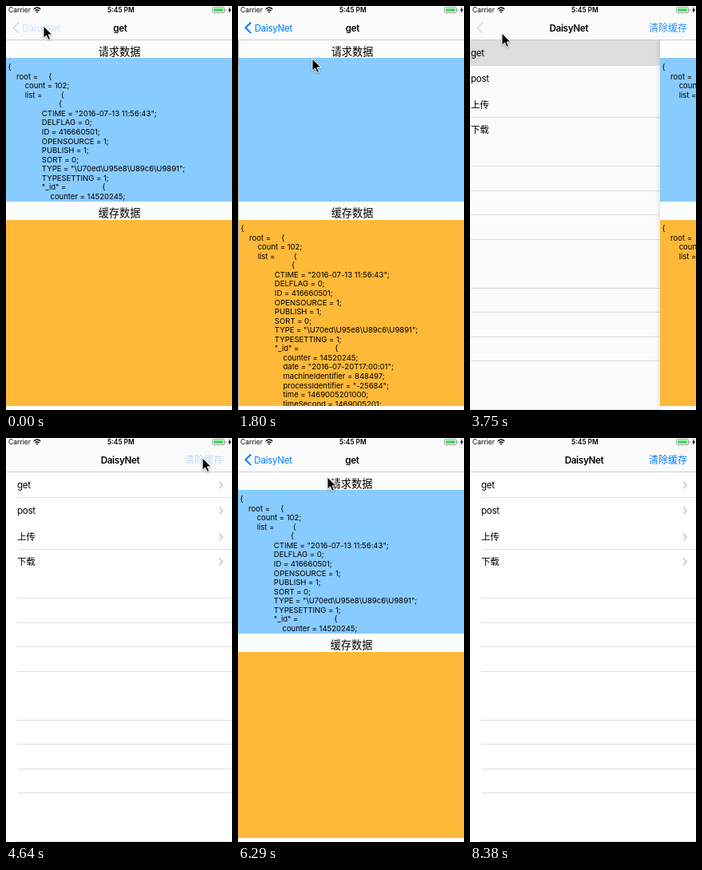
Write an HTML page that moves like this. It is 283 by 506 pixels and loops after 8770 ms.

```html
<!DOCTYPE html>
<html lang="zh-CN">
<head>
<meta charset="utf-8">
<title>DaisyNet</title>
<style>
html, body { margin: 0; width: 100%; height: 100%; overflow: hidden; background: #fff; }
#stage { position: relative; width: 283px; height: 506px; overflow: hidden; background: #fff; color: #000;
  font: 11.6px/20px Inter, "Noto Sans CJK SC", "Noto Sans CJK", sans-serif; }
#stage div, #stage span, #stage svg { position: absolute; white-space: pre; }
#list, #page { left: 0; top: 0; width: 283px; height: 506px; background: #fff; }
#stage #page { background: #fcfcfc; }
#hi { top: 43px; width: 283px; height: 31px; background: #d9d9d9; }
.rule { left: 14px; width: 269px; height: 1px; background: #dfdfe1; }
.row { left: 14px; letter-spacing: -.3px; }
#dim { inset: 0; background: #000; }
.label { left: .5px; width: 283px; text-align: center; font-size: 13.2px; }
.box { left: 0; width: 283px; overflow: hidden; }
.box div { left: 2.5px; font-size: 9.6px; line-height: 11.56px; letter-spacing: -.05px; }
#bar { left: 0; top: 0; width: 283px; height: 42px; background: #fbfbfb; border-bottom: 1px solid #cfcfd1; }
.mid { left: 0; width: 286px; top: 18px; text-align: center; letter-spacing: -.3px; }
.bold { font-weight: 600; }
.blue { color: #007aff; }
#clear { left: 224px; top: 18px; font-size: 12px; }
.status { font-size: 8.4px; top: -5px; }
#cursor { left: -1px; top: 0; filter: drop-shadow(0 1px 1px rgba(0,0,0,.3)); }
</style>
</head>
<body>
<div id="stage">
  <div id="list"><div id="hi"></div></div>
  <div id="page">
    <div class="label" style="top:47px">请求数据</div>
    <div class="box" style="top:65px;height:180px;background:#88cbff"><div id="fresh" style="top:6px"></div></div>
    <div class="label" style="top:249px">缓存数据</div>
    <div class="box" style="top:268px;height:233px;background:#ffb938"><div id="cached" style="top:5px"></div></div>
  </div>
  <div id="bar">
    <span class="status" style="left:3px;letter-spacing:.1px">Carrier</span>
    <svg style="left:34px;top:0" width="10" height="10" fill="none" stroke="#000" stroke-width="1.4">
      <path d="M.8 4Q5 .2 9.2 4M2.5 6Q5 3.8 7.5 6"/><path d="M3.6 7.3Q5 6 6.4 7.3L5 8.8Z" fill="#000" stroke="none"/>
    </svg>
    <span class="status bold" style="left:127px">5:45 PM</span>
    <svg style="left:258px;top:0" width="25" height="10">
      <rect x=".5" y="1.5" width="15" height="7" rx="1.6" fill="none" stroke="#999"/>
      <rect x="2" y="3" width="12" height="4" rx=".6" fill="#4cd964"/>
      <path d="M17 4v2.4" stroke="#999"/>
      <path d="M22.8 1L20 5.4h1.8L21.2 9l3-4.6h-1.8Z"/>
    </svg>
    <svg id="chevron" style="left:7px;top:19px" width="11" height="17" fill="none" stroke="#007aff" stroke-width="2">
      <path d="M9.2 1.5L2.4 8.2l6.8 6.7"/>
    </svg>
    <div id="back" class="mid blue">DaisyNet</div>
    <div id="home" class="mid bold">DaisyNet</div>
    <div id="get" class="mid bold">get</div>
    <div id="clear" class="blue">清除缓存</div>
  </div>
  <svg id="cursor" width="14" height="21">
    <path d="M1 1v15.2l3.5-3.3 2.4 5.5 2.6-1.1-2.4-5.4h4.7Z" stroke="#fff" stroke-width="1"/>
  </svg>
</div>
<script>
const $ = id => document.getElementById(id);
const LOOP = 8770, WIDTH = 283;

// Bursts of screen updates: first time, last time, count.
const bursts = [[150, 900, 6], [1350, 2100, 6], [3000, 3900, 7], [4050, 5090, 8],
  [5240, 6140, 7], [6290, 6440, 2], [7040, 8080, 8], [8230, 8380, 2]];
const ticks = [0];
for (const [from, to, n] of bursts)
  for (let i = 0; i < n; i++) ticks.push(Math.floor((from + (to - from) * i / (n - 1)) / 10) * 10);

const moves = [{at: -2000, push: true}, {at: 70}, {at: 1480, push: true}, {at: 3618},
  {at: 5659, push: true}, {at: 7850}];

const pointer = [[0, 47, 24], [150, 47, 24], [450, 60, 32], [900, 148, 66], [1500, 148, 66],
  [1800, 93, 65], [2100, 62, 44], [2850, 62, 44], [3300, 42, 26], [3600, 40, 26], [3750, 40, 33],
  [3900, 52, 36], [4500, 246, 24], [4940, 246, 24], [5090, 240, 30], [5540, 200, 58],
  [5690, 200, 58], [6140, 112, 48], [6900, 112, 48], [7490, 39, 24], [7930, 39, 24], [8230, 60, 30]];

const pad = n => ' '.repeat(n);
const record = ['CTIME = "2016-07-13 11:56:43";', 'DELFLAG = 0;', 'ID = 416660501;', 'OPENSOURCE = 1;',
  'PUBLISH = 1;', 'SORT = 0;', 'TYPE = "\\U70ed\\U95e8\\U89c6\\U9891";', 'TYPESETTING = 1;',
  '"_id" =' + pad(17) + '{'];
const ident = ['counter = 14520245;', 'date = "2016-07-20T17:00:01";', 'machineIdentifier = 848497;',
  'processIdentifier = "-25684";', 'time = 1469005201000;', 'timeSecond = 1469005201;'];
const dump = ['{', pad(4) + 'root =' + pad(5) + '{', pad(8) + 'count = 102;',
  pad(8) + 'list =' + pad(9) + '(', pad(24) + '{',
  ...record.map(s => pad(16) + s), ...ident.map(s => pad(20) + s)].join('\n');
$('fresh').textContent = $('cached').textContent = dump;

const add = html => $('list').insertAdjacentHTML('beforeend', html);
for (const y of [74, 139, 200, 231, 261, 292, 353, 383, 414, 444, 505])
  add(`<div class="rule" style="top:${y}px"></div>`);
[['get', 59], ['post', 91], ['上传', 124], ['下载', 155]].forEach(([name, y]) => add(
  `<span class="row" style="top:${y - 10}px">${name}</span>
   <svg style="left:266px;top:${y - 5}px" width="7" height="10" fill="none" stroke="#c2c2c7" stroke-width="1.4">
   <path d="M1 .8L5.2 5 1 9.2"/></svg>`));
add('<div id="dim"></div>');

const shiftX = (id, x) => $(id).style.transform = `translateX(${x}px)`;
const fade = (id, a) => $(id).style.opacity = a;

function pointerAt(t) {
  const i = pointer.findIndex(k => k[0] > t);
  if (i < 0) return pointer[pointer.length - 1].slice(1);
  const [a, b] = [pointer[i - 1], pointer[i]];
  const f = (t - a[0]) / (b[0] - a[0]);
  return [1, 2].map(j => Math.round(a[j] + (b[j] - a[j]) * f));
}

function draw(now) {
  const clock = now % LOOP;
  const t = ticks.filter(v => v <= clock).pop();

  const move = moves.filter(m => m.at <= t).pop();
  const next = moves.find(m => m.at > t);
  const dt = t - move.at;
  const k = dt * .025;
  const left = (1 + k) * Math.exp(-k);
  const done = left < .001 ? 1 : 1 - left;
  const p = move.push ? done : 1 - done;      // 0 = list, 1 = detail page
  const titleP = p ** (move.push ? 1.16 : .89);
  const pressed = next && next.at - t <= 250;

  shiftX('page', Math.round(WIDTH * (1 - p)));
  $('page').style.boxShadow = p > 0 && p < 1 ? `-1px 0 6px rgba(0,0,0,${move.push ? .28 : .12})` : 'none';
  $('page').style.visibility = p > 0 ? 'visible' : 'hidden';
  shiftX('list', Math.round(-85 * p));
  fade('dim', .1 * p);
  const selecting = next && next.push && next.at - t <= 130;
  fade('hi', move.push || selecting ? 1 : Math.max(0, 1 - (dt / 280) ** 2));

  const backAlpha = pressed && move.push ? .18 : p;
  fade('chevron', backAlpha);
  fade('back', backAlpha);
  fade('home', 1 - p * p);
  shiftX('home', -99 * titleP);
  shiftX('back', -99 * titleP);
  fade('get', p * p);
  shiftX('get', 140 * (1 - p));
  fade('clear', t >= 4600 && t < 4900 ? .25 : 1 - p);

  fade('fresh', t < 1350 || (t >= 1950 && t < 5000) || t >= 6290 ? 1 : 0);
  fade('cached', t >= 1350 && t < 5000 ? 1 : 0);

  const [x, y] = pointerAt(t);
  $('cursor').style.transform = `translate(${x}px, ${y}px)`;
  fade('cursor', t < 8380 ? 1 : 0);
}

const start = performance.now();
function loop() {
  draw(performance.now() - start);
  requestAnimationFrame(loop);
}
loop();
</script>
</body>
</html>
```
